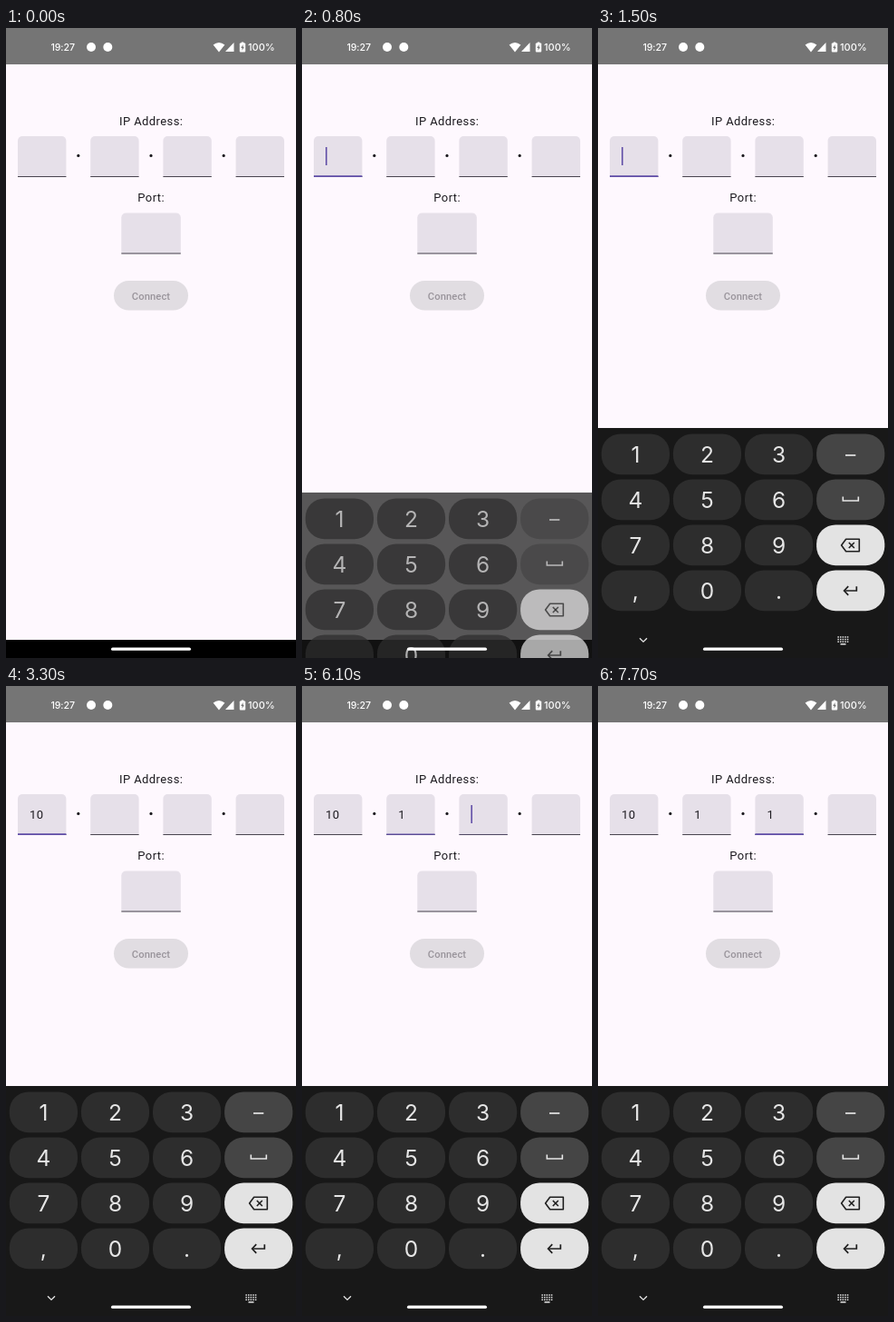
An HTML page with a canvas for the animation above (8 s loop, 320 by 693 pixels).

```html
<!DOCTYPE html>
<html lang="en">
<head>
<meta charset="utf-8">
<title>Connect screen</title>
<style>
html, body { margin: 0; width: 100%; height: 100%; overflow: hidden; background: #000; }
canvas { display: block; width: 320px; height: 693px; }
</style>
</head>
<body>
<canvas id="stage"></canvas>
<script>
const W = 320, H = 693, LOOP = 8000;
const canvas = document.getElementById('stage');
const ctx = canvas.getContext('2d');
const dpr = window.devicePixelRatio || 1;
canvas.width = W * dpr;
canvas.height = H * dpr;

const PURPLE = '#6250a8', INK = '#1d1b20', KEY_INK = '#e6e6e6';
const FIELD_W = 53.4, FIELD_STEP = 80.2, FIELD_X = 13;
const KB_TOP = 440, KB_START = 670, KB_TIME = 285;

// Every entry restarts the cursor blink.
const events = [
  { at: 500, field: 0, text: '' },
  { at: 2100, field: 0, text: '1' },
  { at: 2800, field: 0, text: '10' },
  { at: 3700, field: 1, text: '' },
  { at: 5300, field: 1, text: '1' },
  { at: 6100, field: 2, text: '' },
  { at: 7200, field: 2, text: '1' }
];

const clamp = v => Math.min(1, Math.max(0, v));

// cubic-bezier(.4, 0, .2, 1)
function ease(x) {
  x = clamp(x);
  let lo = 0, hi = 1, u = x;
  for (let i = 0; i < 24; i++) {
    u = (lo + hi) / 2;
    const bx = 1.2 * u * (1 - u) ** 2 + 0.6 * u * u * (1 - u) + u ** 3;
    if (bx < x) lo = u; else hi = u;
  }
  return 3 * u * u * (1 - u) + u ** 3;
}

function rect(x, y, w, h, color) {
  ctx.fillStyle = color;
  ctx.fillRect(x, y, w, h);
}

function round(x, y, w, h, r, color) {
  ctx.fillStyle = color;
  ctx.beginPath();
  ctx.roundRect(x, y, w, h, r);
  ctx.fill();
}

function disc(x, y, r, color) {
  ctx.fillStyle = color;
  ctx.beginPath();
  ctx.arc(x, y, r, 0, 7);
  ctx.fill();
}

function path(points, close) {
  ctx.beginPath();
  points.forEach(([x, y]) => ctx.lineTo(x, y));
  if (close) ctx.closePath();
}

function line(points, color, width, close) {
  path(points, close);
  ctx.strokeStyle = color;
  ctx.lineWidth = width;
  ctx.stroke();
}

function label(str, x, y, font, color, spacing = 0, align = 'left') {
  ctx.font = font;
  ctx.letterSpacing = spacing + 'px';
  ctx.textAlign = align;
  ctx.fillStyle = color;
  ctx.fillText(str, x, y);
}

const BODY = '400 13px Roboto, sans-serif';
const SPACING = 0.42;

function statusBar() {
  rect(0, 0, W, 40, '#757575');
  label('19:27', 49.5, 25, '500 10.6px Inter, sans-serif', '#fff', -0.1);
  disc(94, 21, 5, '#fff');
  disc(112.3, 21, 5, '#fff');

  ctx.fillStyle = '#fff';
  ctx.beginPath();
  ctx.moveTo(235, 26.5);
  ctx.lineTo(228.6, 18.6);
  ctx.quadraticCurveTo(235, 13.2, 241.4, 18.6);
  ctx.fill();
  path([[242, 26], [251.5, 16], [251.5, 26]], true);
  ctx.fill();

  round(259.6, 15.4, 2.8, 2, 0.5, '#fff');
  round(257.8, 16.4, 6.4, 10, 1, '#fff');
  path([[261.6, 18], [259.2, 22], [260.7, 22], [260.4, 25], [262.9, 20.8], [261.4, 20.8]], true);
  ctx.fillStyle = '#757575';
  ctx.fill();
  label('100%', 267, 25, '500 11px Inter, sans-serif', '#fff');
}

function box(x, y, w, focus) {
  round(x, y, w, 45, [5, 5, 0, 0], '#e6e0e9');
  rect(x, y + 44, w, 1, '#49454f');
  if (focus > 0) {
    ctx.globalAlpha = focus;
    rect(x, y + 44 - 0.8 * focus, w, 1 + 0.8 * focus, PURPLE);
    ctx.globalAlpha = 1;
  }
}

function form(t) {
  const texts = ['', '', '', ''];
  const focusAt = [], blurAt = [];
  let last = null;
  for (const e of events) {
    if (e.at > t) break;
    if (!last || last.field !== e.field) {
      focusAt[e.field] = e.at;
      if (last) blurAt[last.field] = e.at;
    }
    texts[e.field] = e.text;
    last = e;
  }

  label('IP Address:', 160.2, 106.8, BODY, INK, SPACING, 'center');
  label('Port:', 160.2, 191.4, BODY, INK, SPACING, 'center');

  texts.forEach((text, i) => {
    const x = FIELD_X + i * FIELD_STEP;
    let focus = 0;
    if (focusAt[i] !== undefined) focus = clamp((t - focusAt[i] + 30) / 150);
    if (blurAt[i] !== undefined) focus = 1 - clamp((t - blurAt[i] + 30) / 150);
    box(x, 119, FIELD_W, focus);
    label(text, x + 13, 145.7, BODY, INK, SPACING);
    if (last && last.field === i && (t - last.at) % 1000 < 500) {
      const end = text ? ctx.measureText(text).width : 0;
      rect(x + 13 + end, 131, 1.6, 20, PURPLE);
    }
    if (i < 3) disc(x + 66.8, 140.4, 1.6, INK);
  });

  box(127.3, 203.5, 65.5, 0);
  round(119, 278, 82, 32.6, 16.3, '#e1dde2');
  label('Connect', 160, 298.6, '500 11.2px Roboto, sans-serif', '#99949b', 0.08, 'center');
}

function icons() {
  line([[273, 470], [284.3, 470]], KEY_INK, 1.7);
  line([[270.3, 515.5], [270.3, 520], [287.3, 520], [287.3, 515.5]], KEY_INK, 1.6);

  const dark = '#202020';
  ctx.lineJoin = 'round';
  line([[268.6, 569], [273.6, 562.2], [288.3, 562.2], [288.3, 575.8], [273.6, 575.8]], dark, 1.6, true);
  ctx.lineJoin = 'miter';
  line([[276.8, 566], [282.8, 572]], dark, 1.6);
  line([[282.8, 566], [276.8, 572]], dark, 1.6);
  line([[285.3, 614.3], [285.3, 619], [272.3, 619]], dark, 1.7);
  line([[276.2, 614.2], [271.6, 619], [276.2, 623.8]], dark, 1.7);

  line([[46, 671.3], [50, 675.2], [54, 671.3]], KEY_INK, 1.3);
  for (let r = 0; r < 3; r++)
    for (let c = 0; c < 5; c++)
      rect(264.4 + c * 2.6, 669.2 + r * 2.6, 1.5, 1.5, KEY_INK);
  rect(267.5, 677, 6, 1.5, KEY_INK);
}

function keyboard(t) {
  const p = ease((t - KB_START) / KB_TIME);
  if (p <= 0) return;
  ctx.save();
  ctx.globalAlpha = p;
  ctx.translate(0, (1 - p) * (H - KB_TOP));
  rect(0, KB_TOP, W, H - KB_TOP, '#181818');
  const rows = ['123', '456', '789', ',0.'];
  rows.forEach((row, r) => {
    const y = 446.4 + r * 50;
    for (let c = 0; c < 4; c++) {
      const color = c < 3 ? '#2d2d2d' : r < 2 ? '#454545' : '#e3e3e3';
      round(3.8 + c * 79.1, y, 75.2, 44.8, 21, color);
      if (c < 3)
        label(row[c], 41.4 + c * 79.1, y + 31.6, '400 24.5px Inter, sans-serif', KEY_INK, 0, 'center');
    }
  });
  icons();
  ctx.restore();
}

function draw(t) {
  ctx.setTransform(dpr, 0, 0, dpr, 0, 0);
  rect(0, 0, W, H, '#fef8fe');
  statusBar();
  form(t);
  rect(0, 673, W, 20, '#000');
  keyboard(t);
  round(116, 681.6, 88, 3.2, 1.6, '#fff');
}

const start = performance.now();
function tick() {
  draw((performance.now() - start) % LOOP);
  requestAnimationFrame(tick);
}
tick();
</script>
</body>
</html>
```
